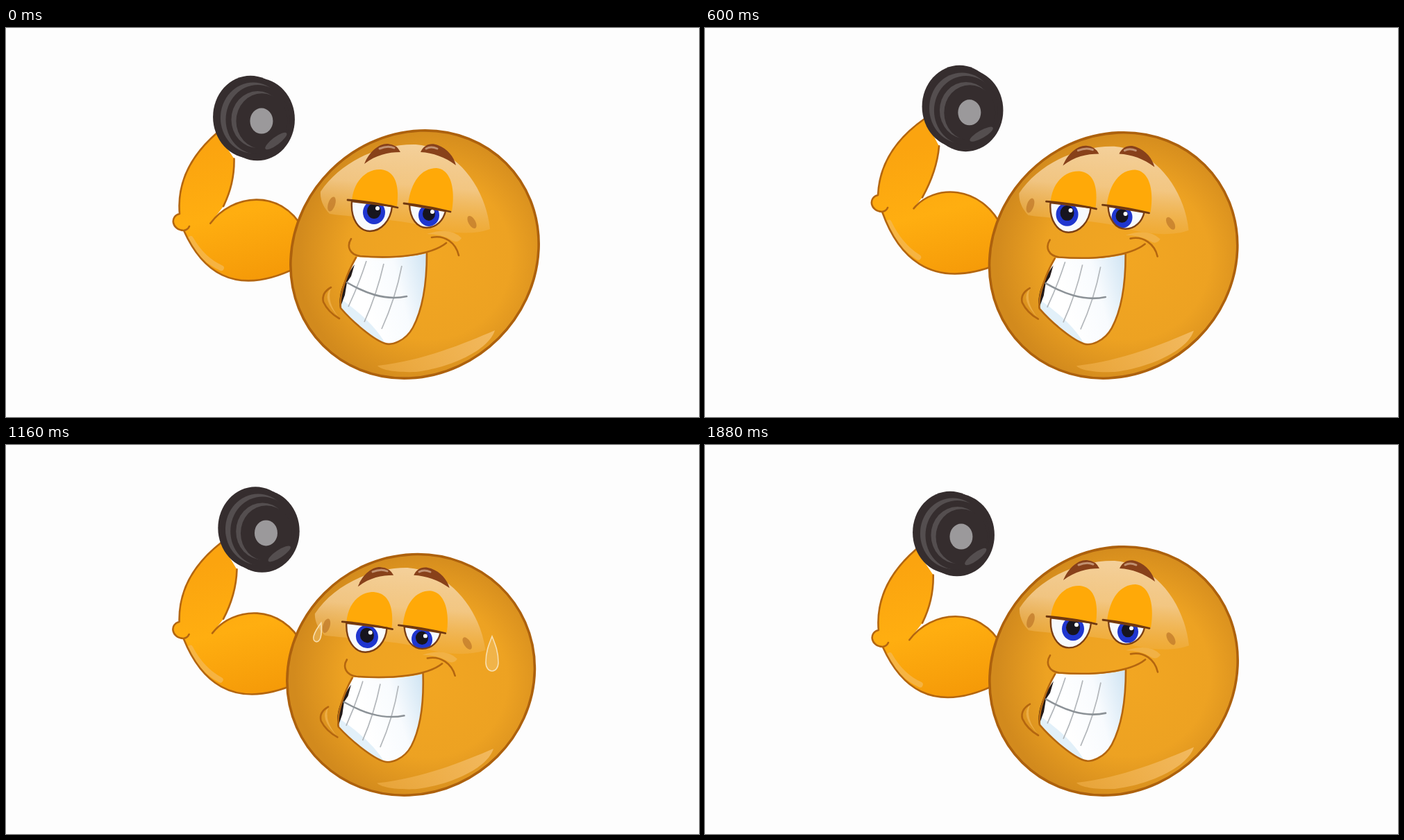
An HTML page for the animation above (1920 ms loop, 998 by 561 pixels).

```html
<!DOCTYPE html>
<html lang="en">
<head>
<meta charset="utf-8">
<title>Dumbbell curl</title>
<style>
html, body { margin: 0; width: 100%; height: 100%; overflow: hidden; background: #fdfdfd; }
svg { display: block; width: 100vw; height: 100vh; }
.line { fill: none; stroke: #b4660f; stroke-width: 2.6; stroke-linecap: round; stroke-linejoin: round; }
.lid { fill: #ffa908; }
.lash { fill: none; stroke: #70380f; stroke-width: 2.8; stroke-linecap: round; }
.rim { fill: none; stroke: #7b3f14; stroke-width: 2.4; }
.brow { fill: #88411a; }
.shine { fill: none; stroke: #c09070; stroke-width: 3; stroke-linecap: round; }
.spot { fill: #c07a2a; opacity: .75; }
.dark { fill: #352d2e; }
.grey { fill: #544e4f; }
</style>
</head>
<body>
<svg viewBox="0 0 998 561">
  <defs>
    <radialGradient id="skin" gradientUnits="userSpaceOnUse" cx="600" cy="345" r="190">
      <stop offset="0" stop-color="#f2a622"/>
      <stop offset=".62" stop-color="#eda222"/>
      <stop offset="1" stop-color="#d28a1d"/>
    </radialGradient>
    <linearGradient id="glow" gradientUnits="userSpaceOnUse" x1="585" y1="168" x2="575" y2="298">
      <stop offset="0" stop-color="#f4d09a"/>
      <stop offset=".45" stop-color="#f3ca8c" stop-opacity=".9"/>
      <stop offset="1" stop-color="#f0b553" stop-opacity=".25"/>
    </linearGradient>
    <linearGradient id="chin" gradientUnits="userSpaceOnUse" x1="535" y1="490" x2="705" y2="440">
      <stop offset="0" stop-color="#f0b04a" stop-opacity=".6"/>
      <stop offset="1" stop-color="#f2b95f"/>
    </linearGradient>
    <linearGradient id="enamel" gradientUnits="userSpaceOnUse" x1="515" y1="375" x2="612" y2="350">
      <stop offset="0" stop-color="#fff"/>
      <stop offset=".5" stop-color="#f8fbfe"/>
      <stop offset="1" stop-color="#cfe4f3"/>
    </linearGradient>
    <linearGradient id="muscle" gradientUnits="userSpaceOnUse" x1="300" y1="170" x2="350" y2="365">
      <stop offset="0" stop-color="#fba40f"/>
      <stop offset=".5" stop-color="#ffae10"/>
      <stop offset="1" stop-color="#f59a08"/>
    </linearGradient>
    <clipPath id="eyeL"><path id="whiteL" d="M498 250C496 275 508 293 524 293S554 278 556 257Z"/></clipPath>
    <clipPath id="eyeR"><path id="whiteR" d="M581 255C582 275 592 288 606 288S630 277 633 264Z"/></clipPath>
  </defs>

  <path id="armFill" fill="url(#muscle)"/>
  <path id="armShine" fill="none" stroke="#f5b851" stroke-width="8" stroke-linecap="round" opacity=".8"/>
  <path id="armLine" class="line"/>
  <g id="bell"></g>

  <g id="head">
    <ellipse cx="588.5" cy="326.5" rx="186" ry="171" transform="rotate(-45 588.5 326.5)" fill="url(#skin)" stroke="#ad610d" stroke-width="3.6"/>
    <path fill="url(#glow)" d="M453 236C480 195 535 167 590 168C645 172 690 225 697 290C670 300 630 295 600 285C560 275 490 272 466 268C458 260 452 248 453 236Z"/>
    <path fill="url(#chin)" d="M535 487C600 480 660 455 704 436C695 465 640 490 590 496C560 497 540 493 535 487Z"/>
    <ellipse class="spot" cx="469" cy="254" rx="5" ry="11" transform="rotate(18 469 254)"/>
    <ellipse class="spot" cx="671" cy="280" rx="5" ry="10" transform="rotate(-30 671 280)" opacity=".5"/>

    <path class="brow" d="M516 196C523 178 538 166 550 167Q563 168 568 179C550 179 533 183 516 196Z"/>
    <path class="brow" d="M597 179C602 168 612 165 622 169C636 174 645 186 648 198C632 186 615 180 597 179Z"/>
    <path class="shine" d="M538 174Q550 169 559 173M605 174Q612 170 621 174"/>

    <path class="lid" d="M498 250C500 222 518 203 540 204C560 206 567 226 563 257Z"/>
    <path class="lid" d="M579 254C583 222 598 202 620 202C642 204 647 235 642 264Z"/>
    <use href="#whiteL" fill="#f7fafd"/>
    <use href="#whiteR" fill="#f7fafd"/>
    <g clip-path="url(#eyeL)"><g class="iris">
      <ellipse cx="530" cy="266" rx="16" ry="17" fill="#1f36cf"/>
      <ellipse cx="530" cy="264" rx="10" ry="11" fill="#17151f"/>
      <circle cx="535" cy="260" r="3" fill="#fff"/>
    </g></g>
    <g clip-path="url(#eyeR)"><g class="iris">
      <ellipse cx="609" cy="270" rx="15" ry="16" fill="#1f36cf"/>
      <ellipse cx="609" cy="268" rx="9" ry="10" fill="#17151f"/>
      <circle cx="614" cy="265" r="3" fill="#fff"/>
    </g></g>
    <use href="#whiteL" class="rim"/>
    <use href="#whiteR" class="rim"/>
    <path class="lash" d="M492 248Q530 251 564 259M573 253Q608 257 640 265"/>

    <path fill="#f3b755" opacity=".7" d="M606 297Q640 286 656 303Q650 312 640 305Q626 297 606 297Z"/>
    <path fill="url(#enamel)" d="M506 330C540 333 575 332 606 325C606 360 603 400 586 432C575 452 555 458 546 455C530 450 500 425 482 404C481 385 492 352 506 330Z"/>
    <path fill="#d6eaf7" opacity=".7" d="M482 404C500 425 530 450 546 455Q530 425 484 392Z"/>
    <path fill="#241a18" d="M502 341C488 360 478 382 481 404L488 385L491 367L497 358Z"/>
    <path fill="none" stroke="#b3b7bb" stroke-width="1.7" d="M519 336Q508 370 493 402M544 340Q534 384 516 424M570 343Q561 390 541 434"/>
    <path fill="none" stroke="#8c9297" stroke-width="2.6" stroke-linecap="round" d="M491 367C515 381 545 394 577 387"/>
    <path class="line" d="M606 325C606 360 603 400 586 432C575 452 555 458 546 455C530 450 500 425 482 404C479 385 492 352 504 331"/>
    <path class="line" d="M497 304C490 315 495 327 510 329C560 333 612 328 634 310M613 302C632 298 648 310 652 328"/>
    <path fill="#f3b755" opacity=".7" d="M468 375Q453 390 480 418Q461 395 468 375Z"/>
    <path class="line" d="M468 374Q454 382 457 395Q464 410 480 419"/>
  </g>

  <g fill="#f7d493" fill-opacity=".35" stroke="#f8dfb0" stroke-width="1.6">
    <path class="drop" d="M0-1C.2-.5.36-.1.36.5C.36.8.2 1 0 1S-.36.8-.36.5C-.36-.1-.2-.5 0-1Z" vector-effect="non-scaling-stroke"/>
    <path class="drop" d="M0-1C.2-.5.36-.1.36.5C.36.8.2 1 0 1S-.36.8-.36.5C-.36-.1-.2-.5 0-1Z" vector-effect="non-scaling-stroke"/>
  </g>
</svg>
<script>
const LOOP = 1920, STEP = 40, FLOOR = 506;
const $ = id => document.getElementById(id);
const lerp = (a, b, k) => a + (b - a) * k;
const clamp = (v, lo, hi) => Math.min(hi, Math.max(lo, v));

// time, bell x, bell y, elbow y, head lean, head stretch, gaze x, gaze y
const poses = [
  [0, 357, 130, 281, 0, 1, 0, 0],
  [120, 377, 148, 273, .026, .97, -5, 1],
  [240, 401, 164, 250, .043, .939, -10, 2],
  [400, 385, 132, 248, .018, .968, -9, 0],
  [520, 370, 113, 252, 0, .992, -8, 0],
  [600, 371, 116, 254, .002, .992, -8, 1],
  [800, 404, 162, 244, .071, .912, -5, -2],
  [960, 390, 137, 247, .045, .948, -5, 1],
  [1120, 366, 119, 263, .031, .972, -3, 4],
  [1160, 364, 122, 268, .03, .973, -3, 4],
  [1280, 370, 137, 276, .045, .968, -2, 4],
  [1440, 396, 168, 269, .068, .955, -1, 4],
  [1560, 388, 148, 264, .042, .967, -1, 3],
  [1700, 364, 127, 274, .007, .995, 0, 1],
  [1880, 358, 128, 280, 0, 1.003, 0, 0]
];

function poseAt(t) {
  const n = poses.length;
  const key = i => {
    const [at, ...v] = poses[(i + n) % n];
    return { at: at + Math.floor(i / n) * LOOP, v };
  };
  let i = n - 1;
  while (poses[i][0] > t) i--;
  const [a, b, c, d] = [-1, 0, 1, 2].map(j => key(i + j));
  const span = c.at - b.at, u = (t - b.at) / span;
  return b.v.map((p, j) => {
    const q = c.v[j];
    const m = (q - a.v[j]) / (c.at - a.at) * span;
    const o = (d.v[j] - p) / (d.at - b.at) * span;
    return p + u * (m + u * (3 * (q - p) - 2 * m - o + u * (2 * (p - q) + m + o)));
  });
}

function drawArm(bx, by, ey, k) {
  const ex = 250 - 4 * k, lift = ey - lerp(281, 244, k);
  const turn = Math.atan2(by - ey, bx - ex) - Math.atan2(-153, 107);
  const cos = Math.cos(turn), sin = Math.sin(turn);
  const pt = (x, y) => x.toFixed(1) + ' ' + y.toFixed(1) + ' ';
  const fore = (x, y) => pt(ex + x * cos - y * sin, ey + x * sin + y * cos);
  const elbow = (x, y) => pt(ex + x, ey + y);
  // upper arm: open place, curled place, swinging about the shoulder
  const upper = (x0, y0, x1, y1) => {
    const x = lerp(x0, x1, k);
    return pt(x, lerp(y0, y1, k) + lift * clamp((412 - x) / 165, 0, 1));
  };
  const outer = 'M' + upper(420, 345, 420, 330) +
    'C' + upper(325, 392, 312, 385) + upper(280, 345, 265, 325) + elbow(6, 11) +
    'C' + elbow(-12, 10) + elbow(-14, -10) + elbow(0, -13) +
    'Q' + fore(-6, -78) + fore(53, -130);
  const hand = fore(78, -93), pit = upper(313, 257, 313, 250);
  const inner = 'Q' + fore(79, -57) + pit;
  const start = upper(294, 282, 322, 242);
  const bicep = 'C' + upper(325, 240, 345, 215) + upper(395, 230, 405, 215) + upper(428, 290, 428, 280);
  $('armFill').setAttribute('d', outer + 'L' + hand + inner + 'L' + start + bicep + 'Z');
  $('armLine').setAttribute('d', outer + 'M' + hand + inner + 'M' + start + bicep +
    'M' + elbow(6, 11) + 'Q' + elbow(12, 10) + elbow(14, 5));
  $('armShine').setAttribute('d', 'M' + upper(266, 304, 261, 274) +
    'Q' + upper(283, 334, 273, 311) + upper(310, 346, 298, 330));
}

function drawBell(x, y, k) {
  const ox = lerp(11, 6, k), oy = lerp(4, 12, k);
  const disc = (shift, rx, ry, look) =>
    `<ellipse cx="${x + ox * shift}" cy="${y + oy * shift}" rx="${rx}" ry="${ry}" ${look}/>`;
  const dark = 'class="dark"', grey = 'class="grey"';
  const tilt = lerp(53, 85, k), r = tilt * Math.PI / 180;
  const gx = x + ox + 35 * Math.cos(r), gy = y + oy + 36 * Math.sin(r);
  $('bell').innerHTML =
    disc(-.45, 54, 59.5, dark) + disc(.45, 54, 59.5, dark) +
    disc(-.1, 47, 51, grey) + disc(.5, 46, 50, dark) +
    disc(.5, 38, 41, grey) + disc(1.05, 37, 40, dark) +
    `<ellipse cx="${gx}" cy="${gy}" rx="19" ry="5.5" class="grey" transform="rotate(${tilt - 90} ${gx} ${gy})"/>` +
    disc(1, 16.5, 18.5, 'fill="#9b999b"');
}

function drawDrops(t) {
  const u = (t - 1160) / 280;
  const alpha = clamp((t - 1000) / 120, 0, 1) * clamp((1660 - t) / 160, 0, 1);
  const places = [
    [lerp(450, 424, u), lerp(270, 339, u), lerp(14, 17, u), lerp(16, 8, u)],
    [lerp(700, 717, u), lerp(301, 338, u), lerp(25, 17, u), lerp(0, -16, u)]
  ];
  document.querySelectorAll('.drop').forEach((drop, i) => {
    const [x, y, size, tilt] = places[i];
    drop.setAttribute('transform', `translate(${x} ${y}) rotate(${tilt}) scale(${Math.max(size, 1)})`);
    drop.setAttribute('opacity', alpha);
  });
}

function draw(now) {
  const t = Math.floor(now % LOOP / STEP) * STEP;
  const [bx, by, ey, lean, stretch, gx, gy] = poseAt(t);
  const angle = Math.atan2(ey - by, bx - 248) * 180 / Math.PI;
  const k = clamp((54.5 - angle) / 26.8, 0, 1);
  drawArm(bx, by, ey, k);
  drawBell(bx, by, k);
  drawDrops(t);
  $('head').setAttribute('transform',
    `matrix(1 0 ${lean} ${stretch} ${-lean * FLOOR} ${FLOOR * (1 - stretch)})`);
  document.querySelectorAll('.iris').forEach(e => e.setAttribute('transform', `translate(${gx} ${gy})`));
}

const begin = performance.now();
function tick() {
  draw(performance.now() - begin);
  requestAnimationFrame(tick);
}
tick();
</script>
</body>
</html>
```
